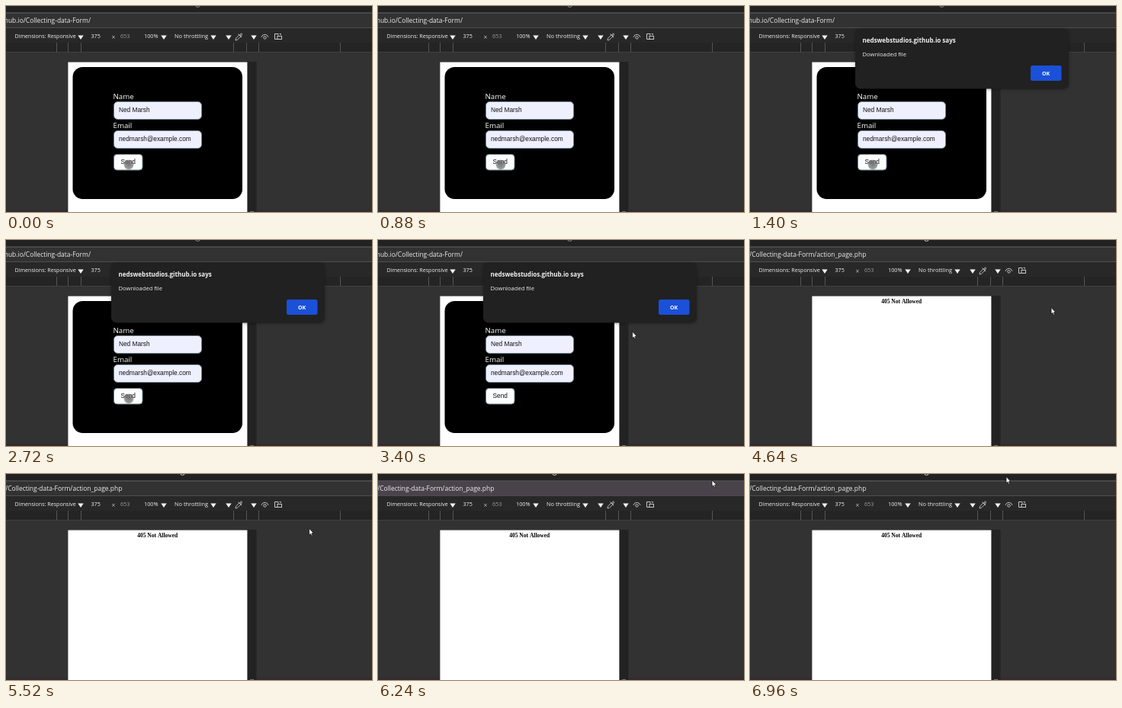
An HTML page with a canvas that plays this animation: 480 px wide and 270 px high, repeating every 7 s.

```html
<!DOCTYPE html>
<html lang="en">
<head>
<meta charset="utf-8">
<title>Form submit</title>
<style>
  html, body { margin: 0; width: 100%; height: 100%; overflow: hidden; background: #323232; }
  canvas { display: block; width: 480px; height: 270px; }
</style>
</head>
<body>
<canvas id="stage" width="480" height="270"></canvas>
<script>
const ctx = document.getElementById('stage').getContext('2d');
const LOOP = 7000, STEP = 40;
const UI = '"Open Sans", "Noto Sans", sans-serif';
const ARIAL = '"Liberation Sans", Arial, sans-serif';
const SERIF = '"Liberation Serif", Times, serif';

// Event times in ms
const OPEN = 1000, MOVE = 3000, HOVER = 3480, CLOSE = 4400, LOAD = 4520;
const BAR_IN = 6080, BAR_OUT = 6320;

// Pointer stops: time, x, y
const path = [
  [3000, 161, 206], [3600, 394, 90], [4120, 395, 88.5], [5160, 395, 88.5],
  [5760, 399, 62], [6200, 438, 8], [6280, 438, 8], [6500, 362, 5], [6800, 336, 3.5], [7000, 336, 3.5]
];

function rect(x, y, w, h, color) {
  ctx.fillStyle = color;
  ctx.fillRect(x, y, w, h);
}

function box(x, y, w, h, r, fill, stroke) {
  ctx.beginPath();
  ctx.roundRect(x, y, w, h, r);
  ctx.fillStyle = fill;
  ctx.fill();
  if (stroke) {
    ctx.strokeStyle = stroke;
    ctx.lineWidth = 1;
    ctx.stroke();
  }
}

function text(str, x, y, size, color, font = UI, weight = 400, align = 'left') {
  ctx.font = `${weight} ${size}px ${font}`;
  ctx.textAlign = align;
  ctx.fillStyle = color;
  ctx.fillText(str, x, y);
}

function poly(points, fill, stroke) {
  ctx.beginPath();
  points.forEach(([x, y]) => ctx.lineTo(x, y));
  ctx.closePath();
  ctx.fillStyle = fill;
  ctx.fill();
  if (stroke) {
    ctx.strokeStyle = stroke;
    ctx.lineWidth = 0.8;
    ctx.stroke();
  }
}

function line(points, color, width = 1) {
  ctx.beginPath();
  points.forEach(([x, y]) => ctx.lineTo(x, y));
  ctx.strokeStyle = color;
  ctx.lineWidth = width;
  ctx.stroke();
}

function icons() {
  const c = '#c8c8c8';
  // Eyedropper
  line([[301, 45], [301.5, 42.3], [306, 37.8], [308, 39.8], [303.5, 44.3], [301, 45]], c, 0.9);
  line([[304.6, 36.6], [309.2, 41.2]], c, 1);
  line([[306.8, 38.8], [308.4, 35.8], [310, 37.4], [307.6, 39.4]], c, 0.9);
  // Eye
  ctx.strokeStyle = c;
  ctx.lineWidth = 1;
  ctx.beginPath();
  ctx.arc(339.5, 42, 4.6, Math.PI * 1.08, Math.PI * 1.92);
  ctx.stroke();
  ctx.beginPath();
  ctx.arc(339.5, 41.4, 1.7, 0, 7);
  ctx.stroke();
  // Rotate
  line([[357, 38.5], [357, 36.5], [352.5, 36.5], [352.5, 43.5], [356, 43.5]], c);
  ctx.strokeRect(356, 39.5, 5.5, 4);
  line([[358.5, 36.5], [360.5, 36.5], [360.5, 38]], c, 0.9);
}

function chrome(t, loaded) {
  rect(0, 0, 480, 270, '#323232');
  rect(0, 0, 480, 8, '#222222');
  const hover = t >= BAR_IN && t < BAR_OUT;
  rect(0, 8.5, 480, 20.5, '#4e4e50');
  rect(0, 10, 480, 18, hover ? '#4b434b' : '#323233');
  rect(0, 29, 480, 19, '#282828');
  rect(0, 48, 480, 13, '#242424');
  rect(0, 60, 480, 1, '#404040');
  for (const x of [66, 81, 98, 298, 315, 331, 438]) rect(x, 48, 1, 12, '#555555');

  // Lower edge of the clipped tab title
  ctx.beginPath();
  ctx.arc(loaded ? 231.5 : 251.5, -1.5, 3, 0, Math.PI);
  ctx.strokeStyle = loaded ? '#d0d0d0' : '#909090';
  ctx.lineWidth = 1;
  ctx.stroke();

  const page = '/Collecting-data-Form/';
  const url = loaded ? page + 'action_page.php' : 'github.io' + page;
  text(url, loaded ? 152.3 : 111, 22, 8.45, '#ececec', UI, 400, 'right');

  const c = '#f0f0f0';
  text('Dimensions: Responsive', 11.5, 42.3, 7.1, c);
  text('375', 111.5, 42.3, 7.2, c);
  text('×', 138.5, 43.5, 8.5, '#c0c0c0');
  text('653', 150, 42.3, 7.2, '#9c9c9c');
  text('100%', 181, 42.3, 7.3, c);
  text('No throttling', 221, 42.3, 7.4, c);
  for (const x of [98, 207, 272, 292, 325]) {
    poly([[x - 3.7, 38.5], [x + 3.7, 38.5], [x, 44]], '#f4f4f4');
  }
  icons();

  rect(316, 73, 12.5, 197, '#222222');
  rect(81.4, 73.6, 235, 197, '#ffffff');
  rect(0, 267, 81, 3, '#332b2e');
  rect(328.5, 267, 152, 3, '#332b2e');
  rect(320, 269, 5, 1, '#777777');
}

function field(label, value, y) {
  text(label, 140.5, y - 4, 9.7, '#ffffff');
  box(141.5, y - 0.5, 115, 23, 5, '#eef0fe', '#71868c');
  text(value, 148, y + 13.4, 8.3, '#101014', ARIAL);
}

function form(t) {
  box(87.5, 80, 222.5, 173, 13, '#000000');
  field('Name', 'Ned Marsh', 126);
  field('Email', 'nedmarsh@example.com', 164);
  box(141.5, 194.5, 37.5, 20.5, 4, '#fcfdfd', '#71868c');
  text('Send', 150.5, 207.3, 8.3, '#101010', ARIAL);
  if (t < MOVE) {
    const g = ctx.createRadialGradient(161, 208, 1, 161, 208, 7);
    g.addColorStop(0, 'rgba(85,85,85,0.75)');
    g.addColorStop(0.75, 'rgba(105,105,105,0.65)');
    g.addColorStop(1, 'rgba(120,120,120,0)');
    ctx.beginPath();
    ctx.arc(161, 208, 7, 0, 7);
    ctx.fillStyle = g;
    ctx.fill();
  }
}

function dialog(t) {
  ctx.save();
  ctx.shadowColor = 'rgba(0,0,0,0.35)';
  ctx.shadowBlur = 4;
  ctx.shadowOffsetY = 1;
  box(138, 29.5, 280, 79, 7, '#212121');
  ctx.restore();
  text('nedswebstudios.github.io says', 147.5, 48, 8, '#f2f2f2', UI, 700);
  text('Downloaded file', 147.5, 66, 7.6, '#eeeeee');
  box(368, 78, 40.5, 20, 2.5, t >= HOVER ? '#3f6fd6' : '#1b50d8');
  text('OK', 388, 90.5, 7, '#ffffff', UI, 700, 'center');
}

function pointer(t) {
  if (t < MOVE) return;
  const i = path.findIndex(p => t < p[0]);
  const [t0, x0, y0] = path[i - 1], [t1, x1, y1] = path[i];
  const k = (t - t0) / (t1 - t0), e = k * k * (3 - 2 * k);
  const x = x0 + (x1 - x0) * e, y = y0 + (y1 - y0) * e;
  const shape = [[0, 0], [0, 8.6], [1.9, 6.9], [3.2, 9.8], [4.6, 9.2], [3.4, 6.4], [5.9, 6.2]];
  poly(shape.map(([dx, dy]) => [x + dx, y + dy]), '#ffffff', '#101010');
}

function draw(now) {
  const t = Math.floor((now % LOOP) / STEP) * STEP;
  const loaded = t >= LOAD;
  chrome(t, loaded);
  if (loaded) text('405 Not Allowed', 198.7, 82.7, 7.5, '#000000', SERIF, 700, 'center');
  else form(t);
  if (t >= OPEN && t < CLOSE) dialog(t);
  pointer(t);
}

const start = performance.now();
function tick() {
  draw(performance.now() - start);
  requestAnimationFrame(tick);
}
tick();
</script>
</body>
</html>
```
